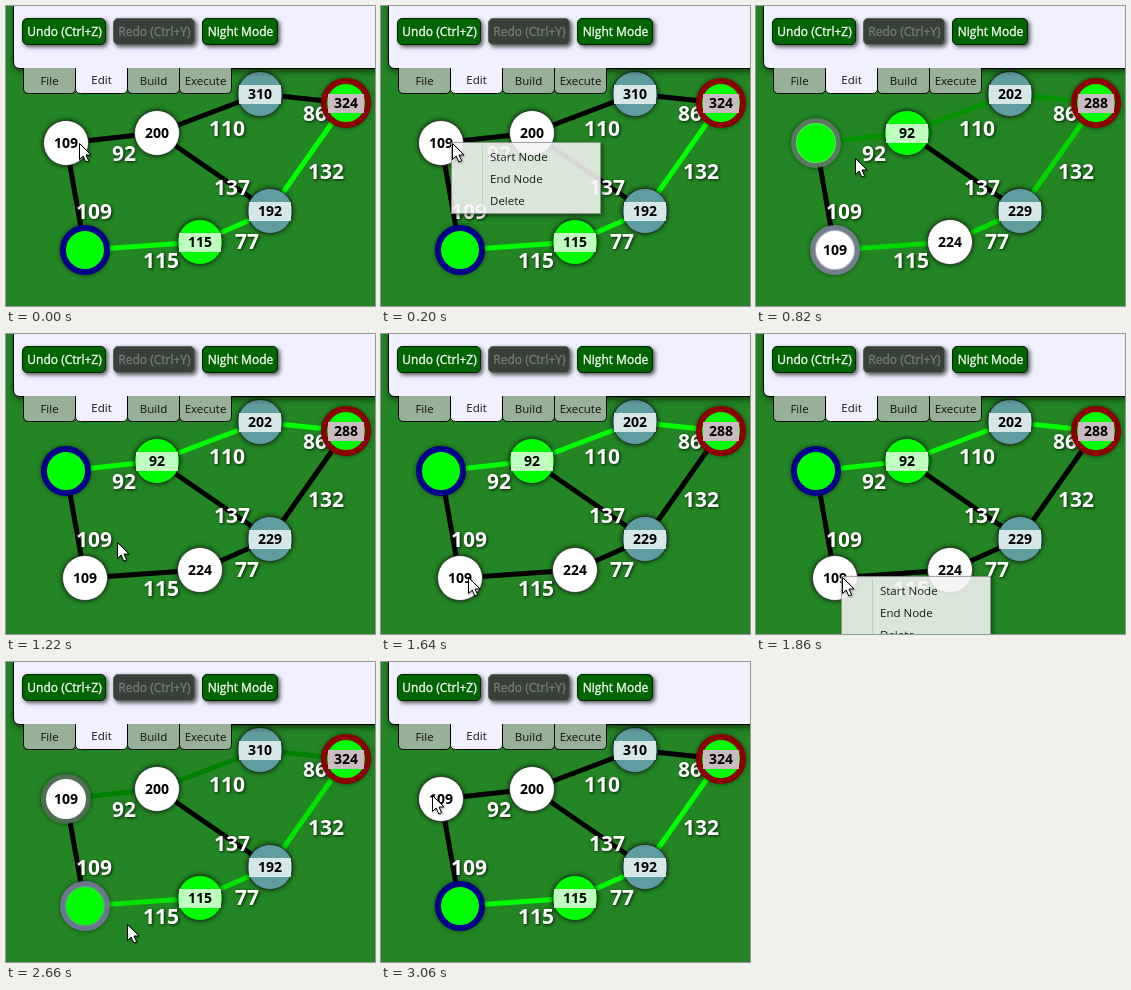
Write an HTML page that moves like this. It is 369x300 px and loops after 3.26 s.

```html
<!DOCTYPE html>
<html lang="en">
<head>
<meta charset="utf-8">
<title>Shortest path editor</title>
<style>
  html, body { margin: 0; height: 100%; overflow: hidden; background: #238523; }
  svg { display: block; width: 369px; height: 300px; font: 11.5px "Open Sans", "Noto Sans", sans-serif; }
  .mid { text-anchor: middle; }
  .panel { filter: drop-shadow(1px 2px 3px #0009); }
  .button { filter: drop-shadow(2px 2px 2px #000a); }
  .node { filter: drop-shadow(0 0 2.5px #000c); }
  .dist { font-size: 14px; font-weight: 700; }
  .cost { font-size: 21px; font-weight: 700; fill: #fff; filter: drop-shadow(1px 1px 1.5px #000c); }
  .menu { filter: drop-shadow(2px 2px 2px #0008); }
  .cursor { filter: drop-shadow(1px 1px 1px #0005); }
</style>
</head>
<body>
<svg viewBox="0 0 369 300"><g id="graph"></g><g id="toolbar"></g><g id="overlay"></g></svg>
<script>
const LOOP = 3260;
const LIME = [0, 255, 0], BLACK = [0, 0, 0], WHITE = [255, 255, 255], NAVY = [0, 0, 139];

// x, y, then [distance, fill] when the route starts at G and at A
const nodes = {
  A: [60, 137, { G: [109, 'white'], A: ['', 'lime'] }],
  B: [151, 127, { G: [200, 'white'], A: [92, 'lime'] }],
  C: [254, 88, { G: [310, 'cadetblue'], A: [202, 'cadetblue'] }],
  D: [340, 97, { G: [324, 'lime'], A: [288, 'lime'] }],
  E: [264, 205, { G: [192, 'cadetblue'], A: [229, 'cadetblue'] }],
  F: [194, 236, { G: [115, 'lime'], A: [224, 'white'] }],
  G: [79, 244, { G: ['', 'lime'], A: [109, 'white'] }]
};

// ends, cost, label x, label baseline, start whose route uses the edge
const edges = [
  ['AB', 92, 118, 155, 'A'], ['BC', 110, 221, 130, 'A'], ['CD', 86, 309, 115, 'A'],
  ['BE', 137, 226, 189, ''], ['ED', 132, 320, 173, 'G'], ['EF', 77, 241, 243, 'G'],
  ['FG', 115, 155, 262, 'G'], ['AG', 109, 88, 213, '']
];

// time, cursor x, cursor y, start node, colour fade, menu opacity, first item hovered
const steps = [
  [0, 73, 137, 'G', 1, 0],
  [200, 71, 137, 'G', 1, .88],
  [420, 82, 144, 'G', 1, 1],
  [600, 99, 152, 'G', 1, 1, true],
  [820, 99, 152, 'A', .3, 0],
  [1020, 99, 152, 'A', .78, 0],
  [1220, 111, 208, 'A', 1, 0],
  [1420, 103, 224, 'A', 1, 0],
  [1640, 87, 243, 'A', 1, 0],
  [1860, 86, 243, 'A', 1, .88],
  [2040, 102, 252, 'A', 1, 1],
  [2240, 121, 262, 'A', 1, 1, true],
  [2440, 121, 262, 'G', .3, 0],
  [2660, 121, 262, 'G', .78, 0],
  [2840, 84, 196, 'G', 1, 0],
  [3060, 51, 133, 'G', 1, 0]
];

const byId = id => document.getElementById(id);
const text = (x, y, str, attrs = '') => `<text x="${x}" y="${y}" ${attrs}>${str}</text>`;
const rect = (x, y, w, h, attrs) => `<rect x="${x}" y="${y}" width="${w}" height="${h}" ${attrs}/>`;
const circle = (x, y, r, attrs) => `<circle cx="${x}" cy="${y}" r="${r}" ${attrs}/>`;

// Colours fade in linear light
const mix = (from, to, p) => `rgb(${from.map((c, i) =>
  Math.round((c ** 2.2 * (1 - p) + to[i] ** 2.2 * p) ** (1 / 2.2)))})`;

function drawEdge([ends, , , , route], start, p) {
  const [x1, y1] = nodes[ends[0]], [x2, y2] = nodes[ends[1]];
  const color = !route ? 'black' : mix(BLACK, LIME, route === start ? p : 1 - p);
  return `<line x1="${x1}" y1="${y1}" x2="${x2}" y2="${y2}" stroke="${color}" stroke-width="5"/>`;
}

function drawNode(name, start, p) {
  const [x, y, looks] = nodes[name];
  const [dist, fill] = looks[start];
  const isEnd = name === 'D';
  const strength = name === start ? p : 'AG'.includes(name) ? 1 - p : 0;
  const ringed = isEnd || strength > 0;
  let out = ringed
    ? circle(x, y, 22, `fill="${fill}" stroke="#2a4a2a" stroke-width="4" class="node"`)
    : circle(x, y, 22.5, `fill="${fill}" stroke="#222" stroke-width=".7" class="node"`);
  if (ringed) {
    const color = isEnd ? '#8b0000' : mix(WHITE, NAVY, strength);
    out += circle(x, y, 22, `fill="none" stroke="${color}" stroke-width="6" ` +
      `stroke-opacity="${isEnd ? 1 : strength}"`);
  }
  if (dist && fill !== 'white') {
    const half = isEnd ? 18 : 21;
    out += rect(x - half, y - 9, half * 2, 19,
      isEnd ? 'fill="#c8bcc0"' : 'fill="white" opacity=".75"');
  }
  return out + text(x, y + 5, dist, 'class="mid dist"');
}

function drawMenu(x, y, opacity, hovered) {
  return `<g transform="translate(${x} ${y})" opacity="${opacity}">` +
    rect(.5, .5, 149, 71, 'fill="#f4f4f4" stroke="#999" class="menu"') +
    rect(31, 3, 1, 66, 'fill="#d9d9d9"') +
    (hovered ? rect(4.5, 3.5, 141, 21, 'fill="#c3e0ee" stroke="#26a0da"') : '') +
    ['Start Node', 'End Node', 'Delete'].map((s, i) => text(39, 19 + 22 * i, s, 'fill="#111"')).join('') +
    '</g>';
}

const drawCursor = (x, y) => `<path transform="translate(${x} ${y})" class="cursor"
  d="M.5 .5V16.5L4.2 13L6.8 19L9.6 17.8L7 12H12Z" fill="white" stroke="black"/>`;

function drawToolbar() {
  const button = (x, w, s, fill, edge, color) =>
    rect(x + .5, 12.5, w - 1, 26, `rx="4.5" fill="${fill}" stroke="${edge}" class="button"`) +
    text(x + w / 2 + .5, 30, s, `class="mid" font-size="12" fill="${color}" stroke="${color}" stroke-width=".3"`);
  const tab = (s, i) => {
    const x = 17.5 + 52 * i, active = s === 'Edit';
    return `<path d="M${x} 62V82.5q0 5 5 5h42q5 0 5-5V62" fill="${active ? '#f0f0ff' : '#98b098'}" stroke="black"/>` +
      (active ? rect(x + .5, 60, 51, 4, 'fill="#f0f0ff"') : '') +
      text(x + 26, active ? 78 : 79, s, 'class="mid" fill="#111"');
  };
  return '<path d="M7.5-5V56q0 6.5 6.5 6.5H380V-5Z" fill="#f0f0ff" stroke="black" class="panel"/>' +
    ['File', 'Edit', 'Build', 'Execute'].map(tab).join('') +
    button(16, 84, 'Undo (Ctrl+Z)', '#006400', '#002800', 'white') +
    button(107, 82, 'Redo (Ctrl+Y)', '#38403a', '#5c635e', '#777d79') +
    button(196, 76, 'Night Mode', '#006400', '#002800', 'white');
}

function show([, x, y, start, p, opacity, hovered]) {
  byId('graph').innerHTML =
    edges.map(e => drawEdge(e, start, p)).join('') +
    edges.map(([, cost, lx, ly]) => text(lx, ly, cost, 'class="mid cost"')).join('') +
    Object.keys(nodes).map(n => drawNode(n, start, p)).join('');
  const [mx, my] = start === 'G' ? [70, 136] : [85, 242];
  byId('overlay').innerHTML = (opacity ? drawMenu(mx, my, opacity, hovered) : '') + drawCursor(x, y);
}

byId('toolbar').innerHTML = drawToolbar();
let current, origin;
function tick(now) {
  origin ??= now;
  const t = (now - origin) % LOOP;
  const step = steps.findLast(s => s[0] <= t);
  if (step !== current) show(current = step);
  requestAnimationFrame(tick);
}
show(current = steps[0]);
requestAnimationFrame(tick);
</script>
</body>
</html>
```
